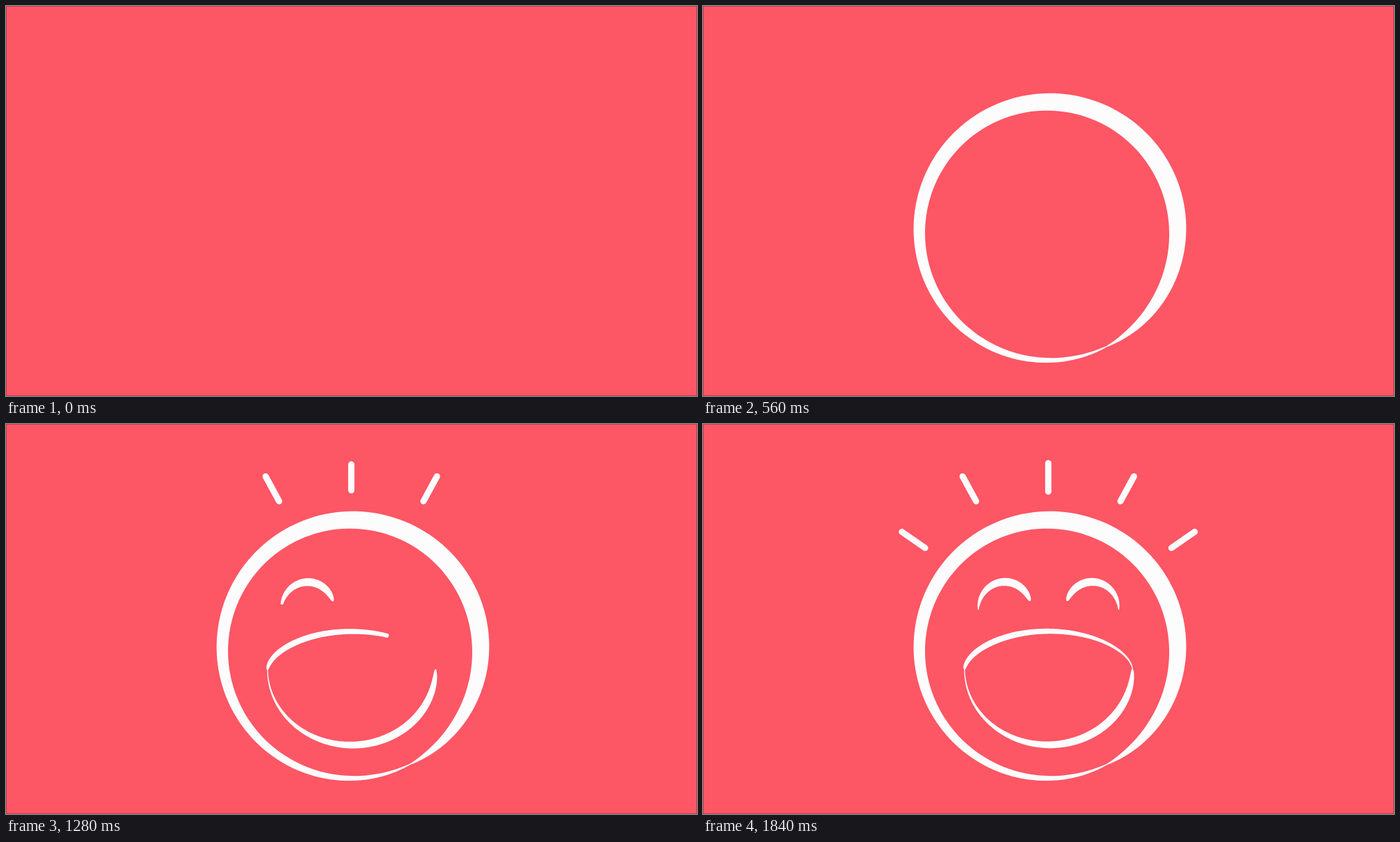
Animation of 996x562 px, one loop 2.96 s. Source, as an HTML page with a canvas:

```html
<!DOCTYPE html>
<html lang="en">
<head>
<meta charset="utf-8">
<title>Laughing face</title>
<style>
html, body { margin: 0; width: 100%; height: 100%; overflow: hidden; background: #fd5665; }
canvas { display: block; width: 996px; height: 562px; }
</style>
</head>
<body>
<canvas id="stage" width="996" height="562"></canvas>
<script>
const W = 996, H = 562, LOOP = 2960, STEP = 80;
const RED = '#fd5665', WHITE = '#fcfcfc';
const ctx = document.getElementById('stage').getContext('2d');

const rad = deg => deg * Math.PI / 180;
const clamp = x => Math.min(1, Math.max(0, x));
const ease = (t, from, to) => 0.5 - 0.5 * Math.cos(Math.PI * clamp((t - from) / (to - from)));

// Brush width along a stroke: thin ends, widest at u = peak
const swell = (width, peak, rise = 0.55) => u =>
  1.2 + width * (u / peak) ** rise * ((1 - u) / (1 - peak)) ** (rise * (1 - peak) / peak);

// Elliptical arc from one angle to another; bend > 1 makes the corners pointed
function brush({ x, y, rx, ry, from, to, width, bend = 1 }) {
  const spine = u => {
    const a = rad(from + (to - from) * u), s = Math.sin(a);
    return [x + rx * Math.cos(a), y + ry * Math.sign(s) * Math.abs(s) ** bend];
  };
  const N = 160, len = [0];
  for (let i = 1; i <= N; i++) {
    const [ax, ay] = spine((i - 1) / N), [bx, by] = spine(i / N);
    len.push(len[i - 1] + Math.hypot(bx - ax, by - ay));
  }
  // Arc position for a share of the length
  const locate = p => {
    const goal = p * len[N];
    let i = 1;
    while (i < N && len[i] < goal) i++;
    return Math.min(1, (i - 1 + (goal - len[i - 1]) / (len[i] - len[i - 1])) / N);
  };
  // Spine point, unit tangent and half width
  const nib = u => {
    const e = 0.001;
    const [ax, ay] = spine(Math.max(0, u - e)), [bx, by] = spine(Math.min(1, u + e));
    const d = Math.hypot(bx - ax, by - ay);
    return { p: spine(u), tx: (bx - ax) / d, ty: (by - ay) / d, h: width(u) / 2 };
  };
  const side = ({ p, tx, ty, h }, sign) => [p[0] - ty * h * sign, p[1] + tx * h * sign];

  return progress => {
    if (progress <= 0) return;
    const end = locate(clamp(progress));
    const nibs = Array.from({ length: N + 1 }, (_, i) => nib(end * i / N));
    const last = nibs[N], bulge = 0.7 * last.h;
    ctx.beginPath();
    for (const n of nibs) ctx.lineTo(...side(n, 1));
    ctx.quadraticCurveTo(last.p[0] + last.tx * bulge, last.p[1] + last.ty * bulge, ...side(last, -1));
    for (const n of nibs.reverse()) ctx.lineTo(...side(n, -1));
    ctx.closePath();
    ctx.fill();
  };
}

const ring = brush({
  x: 498, y: 324.4, rx: 186.2, ry: 186.2, from: 63.2, to: 423.2,
  width: u => 1.5 + (3 + 37 * u) * (1 - u ** 6) * (1 - Math.exp(-40 * u))
});
const jaw = brush({ x: 498, y: 353, rx: 121, ry: 109.3, from: 0, to: 180, width: swell(10.3, 0.28) });
const lip = brush({ x: 498, y: 353.8, rx: 121, ry: 55.2, from: 180, to: 360, width: swell(7.3, 0.3), bend: 1.15 });
const eye = brush({ x: 435, y: 267.5, rx: 38.2, ry: 40, from: -18, to: -180, width: swell(10.2, 0.38) });

function mirrored(draw) {
  ctx.save();
  ctx.translate(W, 0);
  ctx.scale(-1, 1);
  draw();
  ctx.restore();
}

// Visible part of a ray, 0 at its outer end: shoots outwards, then grows back inwards
const burst = (rise, top, leave, gone, full) => t =>
  t < gone ? [1 - ease(t, rise, top), 1 - ease(t, leave, gone)] : [0, ease(t, gone, full)];

const RAY = 40.8;
const rays = [
  { angle: 0, r: 245.5, span: burst(1090, 1310, 1250, 1470, 1660) },
  { angle: 28.6, r: 258, span: burst(1090, 1270, 1290, 1550, 1675) },
  { angle: 55.2, r: 257, span: t => [0, ease(t, 1425, 1790)] }
];

function drawRays(t) {
  for (const { angle, r, span } of rays) {
    const [a, b] = span(t);
    if (b <= a) continue;
    for (const sign of angle ? [-1, 1] : [1]) {
      ctx.save();
      ctx.translate(497.7, 302);
      ctx.rotate(rad(angle * sign));
      ctx.beginPath();
      ctx.moveTo(0, RAY * a - r);
      ctx.lineTo(0, RAY * b - r);
      ctx.stroke();
      ctx.restore();
    }
  }
}

function drawFace(t) {
  const drawn = ease(t, 768, 1438), split = 0.58;
  ctx.save();
  ctx.translate(0, 20 - 37 * ease(t, 1020, 1520) + 17 * ease(t, 1590, 1840));
  jaw(drawn / split);
  lip((drawn - split) / (1 - split));
  eye(ease(t, 1000, 1340));
  mirrored(() => eye(ease(t, 1380, 1660)));
  ctx.restore();
}

function draw(t) {
  ctx.fillStyle = RED;
  ctx.fillRect(0, 0, W, H);
  ctx.lineWidth = 1;
  ctx.strokeStyle = 'rgba(70, 20, 35, 0.35)';
  ctx.strokeRect(0.5, 0.5, W - 1, H - 1);
  ctx.fillStyle = ctx.strokeStyle = WHITE;
  ctx.lineWidth = 9;
  ctx.lineCap = 'round';
  ring(ease(t, 0, 500));
  drawFace(t);
  drawRays(t);
}

const start = performance.now();
function tick() {
  const t = (performance.now() - start) % LOOP;
  draw(Math.floor(t / STEP) * STEP);
  requestAnimationFrame(tick);
}
tick();
</script>
</body>
</html>
```
